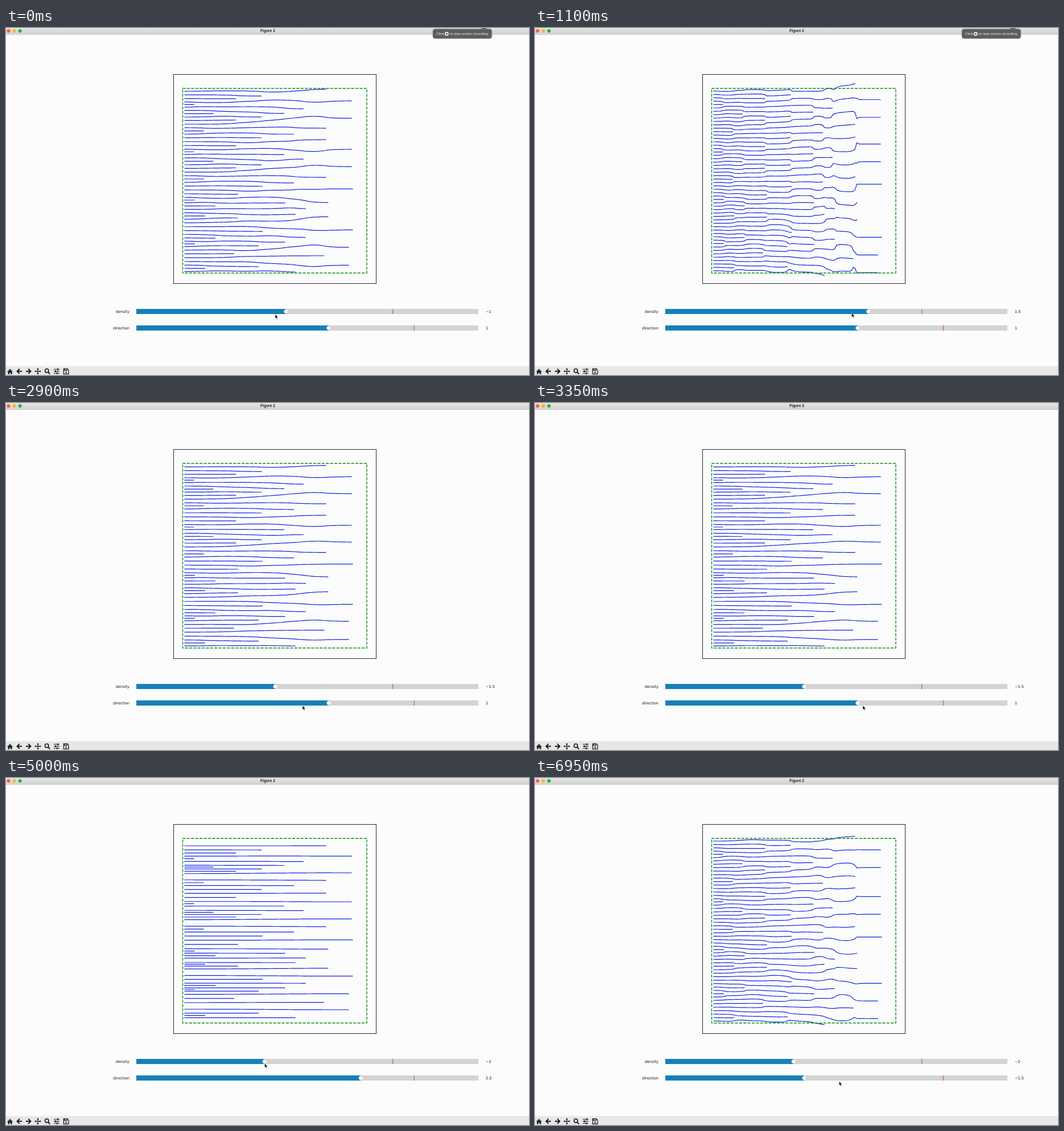
An HTML page for the animation above (7000 ms loop, 919x609 px).

```html
<!DOCTYPE html>
<html lang="en">
<head>
<meta charset="utf-8">
<title>Figure 2</title>
<style>
html, body { margin: 0; width: 100%; height: 100%; overflow: hidden; background: #fcfcfd; }
svg { display: block; width: 919px; height: 609px; }
.ui { font-family: "Liberation Sans", Arial, sans-serif; }
.plot { font: 6.6px "DejaVu Sans", sans-serif; fill: #111; }
</style>
</head>
<body>
<svg viewBox="0 0 919 609" xmlns="http://www.w3.org/2000/svg">
  <defs>
    <linearGradient id="bar" x2="0" y2="1">
      <stop stop-color="#e6e6e6"/><stop offset="1" stop-color="#cfcfcf"/>
    </linearGradient>
  </defs>
  <rect width="919" height="609" fill="#fcfcfd"/>
  <rect width="919" height="12" fill="url(#bar)"/>
  <circle cx="4.5" cy="5" r="3.1" fill="#fb5a50"/>
  <circle cx="14.5" cy="5" r="3.1" fill="#f9b42d"/>
  <circle cx="24.5" cy="5" r="3.1" fill="#22b936"/>
  <text class="ui" x="460" y="7.2" font-size="6.7" font-weight="700" text-anchor="middle" fill="#222">Figure 2</text>

  <path id="lines" fill="none" stroke="#0c22dd" stroke-width="1.2" stroke-linejoin="round"/>
  <rect x="310.5" y="106" width="323.5" height="324" fill="none" stroke="#08900f" stroke-width="1.4" stroke-dasharray="5.2 2.2"/>
  <rect x="294.5" y="81.5" width="356" height="367" fill="none" stroke="#2a2a2a"/>
  <g id="sliders"></g>

  <rect y="593.5" width="919" height="15.5" fill="#e7e7e8"/>
  <g fill="none" stroke="#111" stroke-width="1.2">
    <path d="M2 603l5-4.8 5 4.8-.9.6-4.1-4-4.1 4zM3.5 603.5l3.5-3.4 3.5 3.4v4H8v-2.8H6v2.8H3.5z" fill="#111" stroke="none"/>
    <path id="arrow" d="M28 602.5h-8M23.8 598.2l-4.3 4.3 4.3 4.3" stroke-width="1.8"/>
    <use href="#arrow" transform="matrix(-1 0 0 1 63 0)"/>
    <path d="M51.5 602.5h9M56 598v9"/>
    <path d="M56 596.8l2 2.5h-4zM56 608.2l2-2.5h-4zM50.3 602.5l2.5-2v4zM61.7 602.5l-2.5-2v4z" fill="#111" stroke="none"/>
    <circle cx="71.7" cy="601.5" r="3.2" stroke-width="1.5"/>
    <path d="M74 604l3.3 3.4" stroke-width="1.9"/>
    <path d="M84 599h10M84 602.5h10M84 606h10"/>
    <path d="M91 597.5v3M87 601v3M90 604.5v3" stroke-width="1.8"/>
    <path d="M101.3 598.2h6.7l2 2v6.9h-8.7zM103 598.5v2.7h4v-2.7"/>
    <circle cx="105.6" cy="604.5" r="1.2" fill="#111" stroke="none"/>
  </g>

  <g id="tip" class="ui" font-size="6.25" fill="#f2f2f2">
    <path d="M833 2l4-2h6l4 2z" fill="#5e5e5e"/>
    <rect x="750" y="1.7" width="103.7" height="16.8" rx="4" fill="#5e5e5e" stroke="#8c8c8c" stroke-width=".7"/>
    <text x="756" y="12.3">Click</text>
    <circle cx="774.3" cy="10.2" r="3.4"/>
    <rect x="773" y="8.9" width="2.6" height="2.6" fill="#444"/>
    <text x="780" y="12.3">to stop screen recording</text>
  </g>
  <path id="cursor" d="M0 0v7.3l1.6-1.5 1.2 2.7 1.3-.6-1.2-2.6h2.3z" fill="#000" stroke="#fff" stroke-width=".5"/>
</svg>
<script>
const LOOP = 7000, TICK = 50, LAG = 80;
const LEFT = 313.5, DX = 3, MID = 268.2, SPAN = 313, TAIL_GAP = 31;

// A line stops on one of ten rungs, spaced by narrow and wide steps.
function ladder(narrow, wide, wider) {
  let x = LEFT;
  const half = [narrow, narrow, wide, wider];
  const rungs = [narrow, ...half, wide, ...half].map(step => x += step);
  return levels => levels.map(level => rungs[level - 1]);
}
const upper = ladder(17, 39.7, 45), lower = ladder(18.2, 39.5, 43.3);
const motif = (a, b, c, d) => [a, b, 4, 10, 1, c, d, 3, 5, 4, 10, 9, 2, 7];
const long = [5, 10, 4, 9], short = [1, 6, 3, 8], pair = [2, 7];

const blocks = [
  upper(motif(9, 5, 8, 6)),
  upper(motif(5, 9, 6, 8)),
  lower([...long, ...short, 7, 2]),
  [...lower([4, 9, 10, 5, ...short.slice().reverse()]),
    ...lower([...long, 10, 5]).map(x => x - 7), ...lower(pair)]
];
const lineEnds = blocks.flat();
const blockOf = blocks.flatMap((block, k) => block.map(() => k));
const colsOf = lineEnds.map(end => Math.floor((end - LEFT) / DX) + 1);
const COUNT = lineEnds.length, COLS = Math.max(...colsOf), SIZE = COUNT * COLS;

// Neighbours in a column want an even gap; in the sparse tail only within a block.
const pairs = [];
for (let c = 0; c < COLS; c++) {
  const active = [...colsOf.keys()].filter(i => colsOf[i] > c);
  const tail = active.length <= 8;
  const gap = tail ? TAIL_GAP : SPAN / (active.length - 1.5);
  for (let k = 1; k < active.length; k++) {
    const i = active[k - 1], j = active[k];
    if (!tail || blockOf[i] === blockOf[j]) pairs.push({ a: i * COLS + c, b: j * COLS + c, gap });
  }
}

const dot = (u, v) => {
  let sum = 0;
  for (let k = 0; k < SIZE; k++) sum += u[k] * v[k];
  return sum;
};

// Forces for even gaps (weight) against staying horizontal.
function gradient(y, weight, useGap) {
  const out = new Float64Array(SIZE);
  for (const { a, b, gap } of pairs) {
    const f = weight * DX * (y[b] - y[a] - (useGap ? gap : 0));
    out[a] -= f;
    out[b] += f;
  }
  for (let i = 0; i < COUNT; i++) {
    for (let k = i * COLS + 1; k < i * COLS + colsOf[i]; k++) {
      const f = (y[k] - y[k - 1]) / DX;
      out[k - 1] -= f;
      out[k] += f;
    }
  }
  return out;
}

// Conjugate gradients
function solve(balance) {
  const weight = Math.exp(2 * balance - 2.5);
  const y = new Float64Array(SIZE);
  for (let i = 0; i < COUNT; i++) y.fill(MID + (i - (COUNT - 1) / 2) * 5.8, i * COLS, i * COLS + colsOf[i]);
  const r = gradient(y, weight, true).map(v => -v);
  const d = r.slice();
  let rr = dot(r, r);
  for (let n = 0; n < 1500 && rr > 1e-10; n++) {
    const q = gradient(d, weight, false);
    const step = rr / dot(d, q);
    for (let k = 0; k < SIZE; k++) {
      y[k] += step * d[k];
      r[k] -= step * q[k];
    }
    const next = dot(r, r);
    for (let k = 0; k < SIZE; k++) d[k] = r[k] + next / rr * d[k];
    rr = next;
  }
  return y;
}

const cache = new Map();
function linesPath(balance) {
  if (!cache.has(balance)) {
    const y = solve(balance);
    let mean = 0;
    for (let i = 0; i < COUNT; i++) mean += y[i * COLS] / COUNT;
    const at = k => (y[k] + MID - mean).toFixed(2);
    cache.set(balance, lineEnds.map((end, i) => {
      let d = "M";
      for (let c = 0; c < colsOf[i]; c++) d += `${LEFT + c * DX} ${at(i * COLS + c)} `;
      return d + `${end.toFixed(1)} ${at(i * COLS + colsOf[i] - 1)}`;
    }).join(""));
  }
  return cache.get(balance);
}

// The pointer's journey; a move with a slider drags that slider along.
const DENSITY_Y = 501, DIRECTION_Y = 531;
const moves = [];
function move(start, end, x, y, slider) {
  const last = moves[moves.length - 1] || { x: 473, y: 502.5 };
  moves.push({ start, end, x, y, slider, fromX: last.x, fromY: last.y });
}
move(200, 700, 628, DENSITY_Y - 1.5, "density");
move(700, 850, 640, DENSITY_Y - 1.5, "density");
move(850, 1350, 473, DENSITY_Y, "density");
move(1350, 1600, 552, DIRECTION_Y);
move(1600, 2900, 521, DIRECTION_Y);
move(3050, 3650, 631, DIRECTION_Y, "direction");
move(3850, 4500, 473, DENSITY_Y);
move(4700, 4950, 454.5, DENSITY_Y, "density");
move(5250, 5600, 623, DIRECTION_Y);
move(5700, 6700, 473, DIRECTION_Y, "direction");
move(6700, 6950, 534.5, DIRECTION_Y + 1.5);

const TRACK = 229, TRACK_W = 601;
const sliderX = v => TRACK + (v + 8) / 16 * TRACK_W;
const sliderValue = x => Math.round(((x - TRACK) / TRACK_W * 16 - 8) * 2) / 2;

function along(m, t) {
  const u = Math.min(1, Math.max(0, (t - m.start) / (m.end - m.start)));
  return { x: m.fromX + (m.x - m.fromX) * u, y: m.fromY + (m.y - m.fromY) * u };
}
const lastMove = (t, list) => list.filter(m => m.start <= t).pop();

function dragged(slider, t, initial) {
  const m = lastMove(t - LAG, moves.filter(m => m.slider === slider));
  return m ? sliderValue(along(m, t - LAG).x) : initial;
}

const byId = id => document.getElementById(id);

function makeSlider(name, y, mark) {
  const g = document.createElementNS("http://www.w3.org/2000/svg", "g");
  g.innerHTML = `
    <text class="plot" x="217" y="${y + 2}" text-anchor="end">${name}</text>
    <rect x="${TRACK}" y="${y - 4.5}" width="${TRACK_W}" height="9" fill="#d3d3d3"/>
    <rect class="fill" x="${TRACK}" y="${y - 4.5}" height="9" fill="#1780b8"/>
    <path d="M${sliderX(mark)} ${y - 4.5}v9" stroke="#c2424c" stroke-width="1"/>
    <circle class="knob" cy="${y}" r="3.5" fill="#fff" stroke="#ccc" stroke-width=".6"/>
    <text class="plot value" x="843" y="${y + 2}"></text>`;
  byId("sliders").append(g);
  const [fill, knob, value] = [".fill", ".knob", ".value"].map(s => g.querySelector(s));
  return v => {
    fill.setAttribute("width", sliderX(v) - TRACK);
    knob.setAttribute("cx", sliderX(v));
    value.textContent = (v < 0 ? "\u2212" : "") + Math.abs(v);
  };
}
const setDensity = makeSlider("density", 497.5, 4);
const setDirection = makeSlider("direction", 526.5, 5);

function draw(time) {
  const t = Math.floor(time % LOOP / TICK) * TICK;
  const density = dragged("density", t, -1);
  const direction = dragged("direction", t, 1);
  const { x, y } = along(lastMove(t, moves) || moves[0], t);
  setDensity(density);
  setDirection(direction);
  byId("lines").setAttribute("d", linesPath(density - direction));
  byId("cursor").setAttribute("transform", `translate(${x} ${y})`);
  byId("tip").setAttribute("visibility", t < 1400 ? "visible" : "hidden");
}

let start;
function frame(now) {
  start ??= now;
  draw(Math.max(0, now - start));
  requestAnimationFrame(frame);
}
draw(0);
requestAnimationFrame(frame);
</script>
</body>
</html>
```
